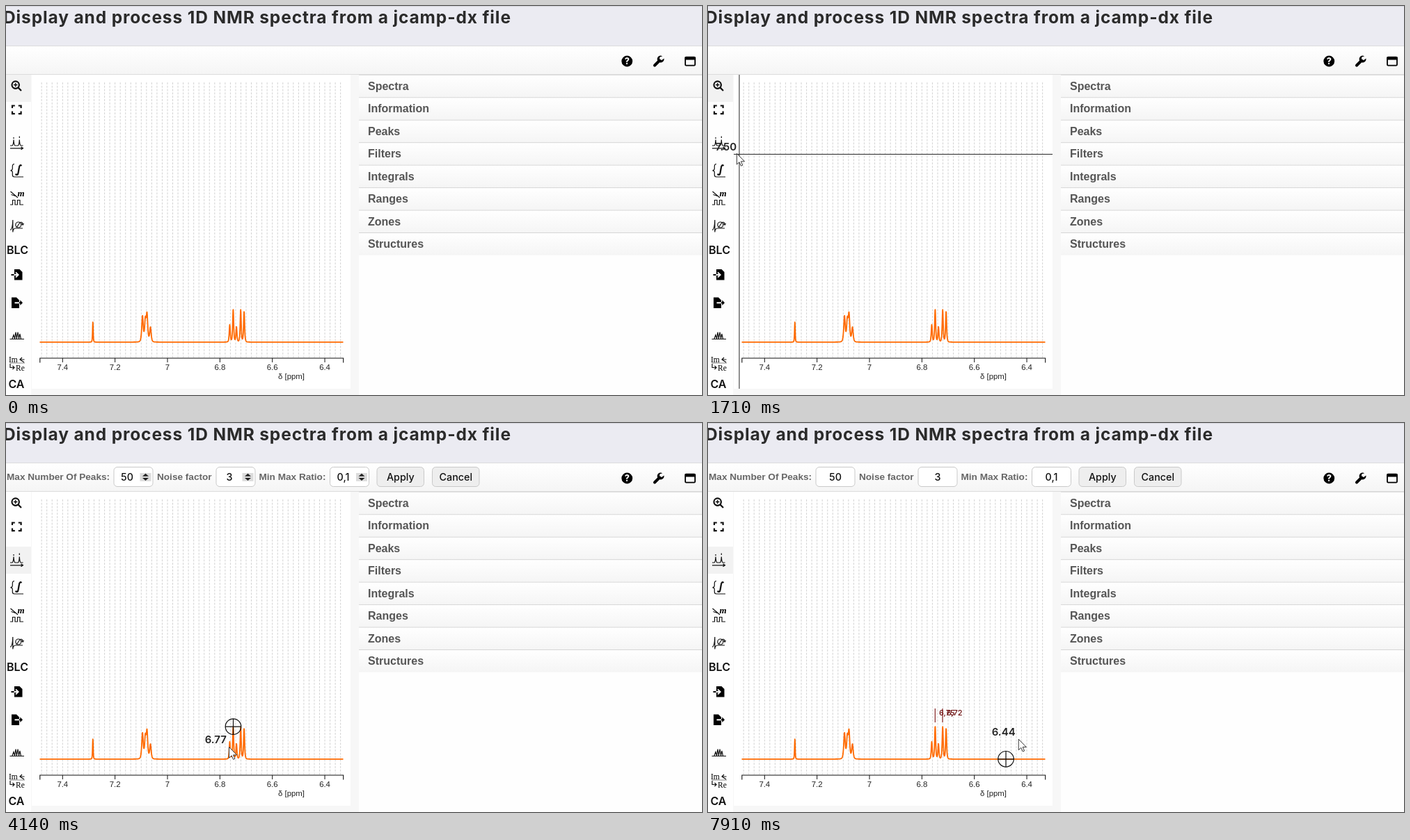
Animation of 1000 by 560 pixels, one loop 8000 ms. Source, as an HTML page:

```html
<!DOCTYPE html>
<html lang="en">
<head>
<meta charset="utf-8">
<title>NMR peak picking</title>
<style>
  html, body { margin: 0; width: 100%; height: 100%; overflow: hidden; background: #fff; }
  svg { display: block; width: 1000px; height: 560px; }
  text { white-space: pre; }
  .ui { font-family: Inter, Lato, sans-serif; }
  .sans { font-family: "Liberation Sans", sans-serif; }
  .serif { font-family: "Liberation Serif", serif; font-size: 11.5px; }
  .head { font-weight: 700; font-size: 24.5px; letter-spacing: .87px; fill: #2b2b2b; }
  .row { font-weight: 700; font-size: 16px; fill: #555; }
  .opt { font-weight: 700; font-size: 13.6px; fill: #666; }
  .val { font-weight: 500; font-size: 14.3px; fill: #111; text-anchor: middle; }
  .side { font-weight: 600; font-size: 16px; fill: #111; }
  .tick { font-size: 11.4px; fill: #222; }
  .ppm { font-weight: 600; font-size: 15px; fill: #222; }
  .mark { font-weight: 500; font-size: 11px; fill: #6b0d0d; }
  .tip { font: 11px "Open Sans", "Noto Sans", sans-serif; fill: #fff; }
  .line { fill: none; stroke: #111; stroke-width: 1.2; }
  .bold { stroke-width: 2.2; }
  .pointer { fill: #fff; stroke: #222; stroke-width: .9; }
</style>
</head>
<body>
<svg viewBox="0 0 1000 560">
  <defs>
    <linearGradient id="fade" x2="0" y2="1">
      <stop stop-color="#fff"/><stop offset="1" stop-color="#f5f5f5"/>
    </linearGradient>
  </defs>

  <rect width="1000" height="560" fill="#fefefe"/>
  <rect width="1000" height="57" fill="#ebebf2"/>
  <path d="M0 .5H1000" stroke="#d6d6dc"/>
  <text class="ui head" x="-4" y="25">Display and process 1D NMR spectra from a jcamp-dx file</text>
  <rect y="58" width="1000" height="40" fill="url(#fade)"/>
  <path d="M0 57.5H1000M0 98.5H1000" stroke="#dcdcdc"/>
  <rect x="36" y="99" width="471" height="461" fill="#f7f7f7"/>
  <rect x="37" y="99" width="458" height="452" fill="#fff"/>
  <g id="rows"></g>
  <g id="options"></g>

  <!-- header icons -->
  <circle cx="892.3" cy="79.5" r="7.9"/>
  <text class="ui" x="892.3" y="84" text-anchor="middle" font-size="12.5" font-weight="800" fill="#fff">?</text>
  <path d="M932 85.5L939 78.5" stroke="#000" stroke-width="4" stroke-linecap="round"/>
  <path d="M943.2 72.2A5 5 0 1 0 945.5 75.6L942 78L938.9 76.6L939.3 73.6Z"/>
  <rect x="976" y="73.6" width="14" height="12" rx="1.3" fill="none" stroke="#000" stroke-width="1.8"/>
  <rect x="975.5" y="73" width="15" height="4.6" rx="1"/>

  <!-- tool icons -->
  <rect id="active" width="36" height="39" fill="#f2f2f2"/>
  <g class="line bold">
    <circle cx="13.7" cy="113.6" r="5.2"/>
    <path d="M17.6 117.6L22 122"/>
    <path d="M11 113.6H16.4M13.7 110.9V116.3" stroke-width="1.5"/>
    <path d="M9 147V143.5H12.8M17.8 143.5H21.6V147M21.6 151.6V155.2H17.8M12.8 155.2H9V151.6"/>
  </g>
  <g class="line">
    <path d="M6 201H9Q10.6 200 11 192.5Q11.4 200 13 201H17.3Q18.9 200 19.3 192.5Q19.7 200 21.3 201H24.5M11 189V191M19.3 187.5V190"/>
    <path d="M6 204.8H24M21.5 202.8L24.5 204.8L21.5 206.8"/>
    <path d="M12 227.5Q9.3 227.5 9.3 231V234Q9.3 236.5 6.5 236.8Q9.3 237 9.3 239.5V243Q9.3 246 12 246H25"/>
    <path class="bold" d="M22.5 230Q19.5 227.5 18.8 233L17.6 240Q17 244.5 13.5 242"/>
    <path d="M6.5 267L17 276M7.5 271.5L13.5 273.5"/>
    <path d="M6 286H9.5V279.5H13V286H16.5V279.5H20V286H25"/>
    <path d="M6 322.5Q9.4 322 9.8 308V325.5Q10.3 320 13.5 320H24"/>
    <circle cx="17.8" cy="315" r="4"/>
    <path d="M15 319L20.6 311M21 311.5Q24 310.5 24 315L22.3 313.4M24 315L25.6 313.2"/>
    <path d="M5.5 479.5H26M9 479L11 473.5L12.5 479L14 469.5L15.3 479L17 469.5L18.5 479L19.8 472L21.5 479"/>
    <path d="M20 509H26.5M23 506L20 509L26 513M6 515V520.5H12M9.5 518L12 520.5L9.5 523"/>
  </g>
  <text class="serif" x="16.5" y="274" style="font: italic 700 13px 'Liberation Serif', serif">m</text>
  <text class="serif" x="4" y="513">Im</text>
  <text class="serif" x="14" y="524.5">Re</text>
  <path d="M5.5 514H27" stroke="#555" stroke-width=".7"/>
  <text class="ui side" x="1" y="357">BLC</text>
  <text class="ui side" x="3.4" y="549.7">CA</text>
  <path d="M12 379H19.5L23.5 383V394.5H12ZM7.5 386H12V388H7.5Z"/>
  <path d="M11.5 387H16.5M14 383.5L17.7 387L14 390.5" fill="none" stroke="#fff" stroke-width="1.8"/>
  <path d="M8 419.5H15L19 423.5V435H8ZM20.3 423.3L24 427.3L20.3 431Z"/>
  <path d="M12.5 427.3H19" stroke="#fff" stroke-width="2"/>
  <path d="M19 427.3H21" stroke="#000" stroke-width="2"/>

  <!-- plot -->
  <g id="grid" stroke="#cfcfcf" stroke-width=".94" stroke-dasharray="2.9 1.9"></g>
  <path id="curve" fill="none" stroke="#ff6a00" stroke-width="1.8" stroke-linejoin="round"/>
  <g id="axis"></g>
  <g id="marks"></g>

  <path id="cross" stroke="#222"/>
  <g id="target" class="line"><circle r="11.3"/><path d="M-11.3 0H11.3M0 -11.3V11.3"/></g>
  <text id="ppm" class="ui ppm"></text>
  <g id="hint">
    <rect x="41" y="187.5" width="127.5" height="20.5" rx="2" fill="#7f7f7f"/>
    <text class="tip" x="44" y="202">Peaks Picking ( Press p )</text>
  </g>
  <circle id="press" r="13.2" fill="#ff0" fill-opacity=".47"/>
  <path id="arrow" class="pointer" d="M.5 .5V16.2L4.1 12.8L6.6 18.3L8.9 17.3L6.5 11.9H11.6Z"/>
  <path id="hand" class="pointer" d="M-1.6 12V1.6Q-1.5 0 .2 0Q1.9 0 2 1.6V7.6Q4.8 6.4 5.5 8.3Q8 7.5 8.8 9.3Q12 8.7 12 11.5V16Q12 18.5 10 21V23H.5V21.2Q-2.5 18.5-5.4 13.8Q-6 11.8-4.4 11.3Q-3 11-1.6 13Z"/>
</svg>

<script>
const LOOP = 8000, BASE = 483.8, PPM = 376.75, LAG = 18, REACH = 14;
const $ = id => document.getElementById(id);
const all = sel => document.querySelectorAll(sel);
const show = (el, on) => el.style.display = on ? '' : 'none';
const place = (id, x, y) => $(id).setAttribute('transform', `translate(${x} ${y})`);
const toX = ppm => 81.3 + (7.4 - ppm) * PPM;
const text = (cls, x, y, s, extra = '') => `<text class="${cls}" x="${x}" y="${y}" ${extra}>${s}</text>`;
const range = (a, b, step) => Array.from({ length: Math.floor((b - a) / step) + 1 }, (_, i) => a + i * step);

// Spectrum: groups of lines [centre, height] that share a width
const groups = [
  { width: .8, lines: [[124.8, 29]] },
  { width: 1.9, lines: [[196.1, 37], [200.2, 30], [202.6, 38], [207.5, 21]] },
  { width: 1.3, lines: [[321.5, 25], [326.4, 47], [331.1, 22], [337.2, 46.5], [342.1, 44]] }
];
const bump = (u, h) => h / (1 + u * u) ** 2;
const level = x => groups.reduce((y, { width, lines }) =>
  lines.reduce((y, [c, h]) => y - bump((x - c) / width, h), y), BASE);
const highest = x => range(x - REACH, x + REACH, .5).reduce((a, b) => level(b) < level(a) ? b : a);

$('curve').setAttribute('d', 'M' + range(48.5, 484.5, .25).map(x => `${x} ${level(x).toFixed(2)}`).join('L'));
$('grid').innerHTML = range(toX(7.48), 485, PPM * .02).map(x => `<path d="M${x} 110V506"/>`).join('');
$('axis').innerHTML = '<path d="M48.8 513.5V507H484.7V513.5" fill="none" stroke="#111" stroke-width="1.1"/>' +
  range(0, 5, 1).map(i => {
    const v = +(7.4 - i * .2).toFixed(1), x = toX(v);
    return `<path d="M${x} 507V513" stroke="#111"/>` + text('sans tick', x, 524.3, v, 'text-anchor="middle"');
  }).join('') + text('sans tick', 391, 537.3, 'δ [ppm]');

$('rows').innerHTML = ['Spectra', 'Information', 'Peaks', 'Filters', 'Integrals', 'Ranges', 'Zones', 'Structures']
  .map((s, i) => {
    const y = 99 + i * 32.46;
    return `<rect x="507" y="${y}" width="493" height="32.46" fill="url(#fade)"/>
      <path d="M507 ${y + .3}H1000" stroke="#d6d6d6"/>` + text('sans row', 520, y + 22, s);
  }).join('');

const box = (x, w, fill) =>
  `<rect x="${x}" y="63.5" width="${w}" height="28" rx="5" fill="${fill}" stroke="#c9c9c9"/>`;
const input = (label, lx, x, value) => text('sans opt', lx, 81.7, label) + box(x, 56, '#fff') +
  text('ui val num', x + 28, 82.6, value) +
  `<g class="spin"><rect x="${x + 37.5}" y="72" width="16" height="11.8" fill="#dcdcdc"/>
    <path d="M${x + 41} 76.8l4.5 -4l4.5 4zM${x + 41} 79l4.5 4l4.5 -4z" fill="#222"/></g>`;
const button = (x, label) => box(x, 67.5, '#eee') + text('ui val', x + 33.8, 82.6, label);
$('options').innerHTML = input('Max Number Of Peaks:', 1, 155, '50') + input('Noise factor', 217, 302, '3') +
  input('Min Max Ratio:', 363.5, 465.5, '0,1') + button(533, 'Apply') + button(612.5, 'Cancel');

const marks = [{ at: 4580, x: 326.3, label: '6,75' }, { at: 6590, x: 337, label: '6,72' }];
$('marks').innerHTML = marks.map(({ x, label }) =>
  `<g><path d="M${x} 411V431" stroke="#7a1010" stroke-width="1.1"/>${text('ui mark', x + 5.7, 421.3, label)}</g>`).join('');

// Pointer moves: [start, end, x, y], each easing out from where the last one stopped
const ENTER = 440, HINT = 2330, PICK = 2560, LEAVE = 2880, FIRST = 4580;
const moves = [
  [ENTER, 930, 298, 310], [1160, 1950, 15, 202], [LEAVE, 3190, 317, 469],
  [3420, 3500, 320, 466], [5130, 5560, 341, 464], [7680, 7990, 453, 454]
];
const presses = [[2400, 2480], [3960, 4140], [4500, FIRST], [6170, 6260], [6740, 6910]];

function pointer(t) {
  return moves.reduce(([px, py], [a, b, x, y]) => {
    const left = 1 - Math.min(1, Math.max(0, (t - a) / (b - a)));
    const k = 1 - left * left;
    return [px + (x - px) * k, py + (y - py) * k];
  }, [811, 542]);
}

function draw(t) {
  const [x, y] = pointer(t), [tx, ty] = pointer(t - LAG);
  const picking = t >= PICK, spin = t < FIRST;
  const onPlot = t >= ENTER && tx > 37 && tx < 495, hand = x < 28;

  $('active').setAttribute('y', picking ? 178 : 99);
  show($('options'), picking);
  all('.spin').forEach(e => show(e, spin));
  all('.num').forEach(e => e.setAttribute('transform', `translate(${spin ? -9 : 0} 0)`));
  show($('hint'), t >= HINT && t < LEAVE);
  marks.forEach((m, i) => show($('marks').children[i], t >= m.at));

  show($('arrow'), t >= ENTER && !hand);
  show($('hand'), hand);
  place('arrow', x, y);
  place('hand', x, y);
  show($('press'), presses.some(([a, b]) => t >= a && t < b));
  place('press', x, y);

  show($('cross'), onPlot && !picking);
  $('cross').setAttribute('d', `M37 ${ty}H495M${tx} 99V551`);
  show($('target'), onPlot && picking);
  const peak = highest(tx);
  place('target', peak, level(peak));
  show($('ppm'), onPlot);
  place('ppm', tx - 34.3, ty - 5);
  $('ppm').textContent = (7.4 - (tx - 81) / PPM).toFixed(2);
}

const start = performance.now();
function tick() {
  draw((performance.now() - start) % LOOP);
  requestAnimationFrame(tick);
}
tick();
</script>
</body>
</html>
```
